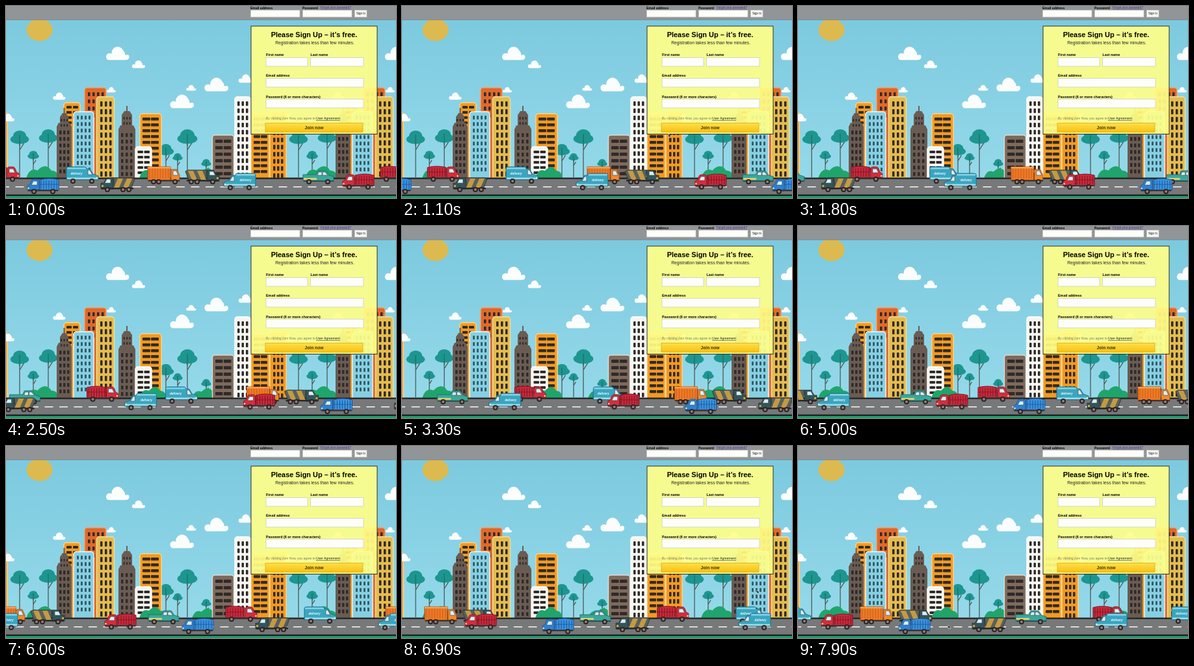
An HTML page for the animation above (8 s loop, 600x296 px).

```html
<!DOCTYPE html>
<html lang="en">
<head>
<meta charset="utf-8">
<title>Sign up</title>
<style>
html, body { margin: 0; width: 100%; height: 100%; overflow: hidden; background: #82cce1; }
svg { display: block; width: 100vw; height: 100vh; font-family: "Liberation Sans", Arial, sans-serif; }
.b { font-weight: bold; }
</style>
</head>
<body>
<svg id="stage" viewBox="0 0 600 296" preserveAspectRatio="none"></svg>
<script>
const LOOP = 8000, STEP = 100, SPEED = 0.061, SPAN = 604, TILE = 429;
const DARK = '#302b2a', BROWN = '#6a5c53', ORANGE = '#f39a20', RUST = '#df692b', GOLD = '#e4bb4d', TEAL = '#1d9690';
const PALE = '#ffd58c';

const rect = (x, y, w, h, fill, more = '') =>
  `<rect x="${x}" y="${y}" width="${w}" height="${h}" fill="${fill}" ${more}/>`;
const oval = (x, y, rx, ry, fill) => `<ellipse cx="${x}" cy="${y}" rx="${rx}" ry="${ry}" fill="${fill}"/>`;
const path = (d, fill, more = '') => `<path d="${d}" fill="${fill}" ${more}/>`;
const line = (d, color, w = 1) => path(d, 'none', `stroke="${color}" stroke-width="${w}"`);
const text = (x, y, size, str, more = '') => `<text x="${x}" y="${y}" font-size="${size}" ${more}>${str}</text>`;
const group = (x, y, body, more = '') => `<g transform="translate(${x} ${y}) ${more}">${body}</g>`;
const times = (n, fn) => Array.from({ length: n }, (_, i) => fn(i)).join('');

// scenery
function panes(x, y, cols, rows, dx, dy, w, h, fill = DARK) {
  return times(cols, c => times(rows, r => rect(x + c * dx, y + r * dy, w, h, fill, 'rx="1"')));
}

function block(x, y, w, fill, edge, inner) {
  return rect(x, y, w, 270 - y, fill, `rx="4" stroke="${edge}" stroke-width="1.4"`) + inner;
}

function tower(x, y, w, top) {
  const m = x + w / 2;
  return path(`M${x} 266V${y}l3 -6h2V${top + 14}l4 -6h${m - x - 10}V${top}h2V${top + 8}h${m - x - 10}l4 6V${y - 6}h2l3 6V266Z`, BROWN)
    + panes(m - 5.5, top + 17, 3, 2, 4.5, 8, 2.2, 4)
    + panes(x + 4, y + 6, 3, 7, (w - 5) / 3, 10, 3.5, 6);
}

function tree(x, y, r) {
  return line(`M${x} ${y - r / 2}V264M${x} ${y + r + 6}l${r * .5} -${r * .8}`, '#4d5a54', 1.3)
    + oval(x, y - r * .15, r * .8, r * .7, TEAL) + oval(x, y + r * .2, r * 1.1, r * .55, TEAL)
    + line(`M${x} ${y - r / 3}V${y + r}`, '#2b5c5a', 1);
}

const bush = (x, w, h) => path(`M${x} 266q${w * .1} -${h} ${w * .35} -${h * .7}q${w * .25} -${h * .7} ${w * .42} 0q${w * .2} 0 ${w * .23} ${h * .7}Z`, '#1fa56c');

function cloud(x, y, w) {
  return group(x, y, path('M-16 9a6 6 0 0 1 0 -11q4 -1 6 1a10 10 0 0 1 19 -6q4 4 3 8q7 -3 7 3q0 5 -7 5Z', '#fbfdfd'), `scale(${w / 38})`);
}

function city() {
  return cloud(172, 75, 35) + cloud(204, 91, 20) + cloud(324, 123, 36) + cloud(271, 149, 36)
    + cloud(82, 140, 19) + cloud(162, 130, 14) + cloud(285, 127, 15) + cloud(369, 113, 22) + cloud(3, 173, 20)
    + tree(21, 203, 13) + tree(65, 201, 13) + tree(42, 230, 8)
    + tree(246, 222, 11) + tree(279, 202, 14) + tree(264, 233, 7) + tree(308, 242, 7)
    + block(89, 149, 25, ORANGE, PALE, panes(93, 154, 2, 4, 10, 8, 8, 4))
    + block(121, 126, 33, RUST, '#f0a069', panes(126, 133, 4, 4, 7, 11, 3.5, 6))
    + bush(31, 50, 18) + tower(78, 186, 23, 157)
    + block(104, 163, 31, '#86cfe3', '#f4fafa', panes(109, 169, 4, 9, 6, 10, 3, 6, '#355e68'))
    + block(139.5, 140, 27, GOLD, '#f5dea0', panes(145, 147, 3, 10, 7, 12, 3.5, 8))
    + tower(173, 190, 26, 154)
    + block(206, 166, 33, ORANGE, PALE, panes(210, 172, 2, 10, 13, 9, 12, 4.5))
    + block(199, 217, 25, '#f4f4ef', '#fff', panes(202.5, 223, 2, 5, 10, 8, 8.5, 4))
    + bush(205, 42, 17) + bush(286, 42, 15)
    + block(317.5, 199, 33, '#7d6a5c', '#e4dcd3', panes(322, 206, 2, 6, 13, 10, 11.5, 5))
    + block(406, 163, 25, ORANGE, PALE, panes(411, 170, 3, 9, 6, 11, 3.5, 7))
    + block(377, 166, 28, ORANGE, PALE, panes(381, 172, 2, 10, 11, 9, 10, 4.5))
    + block(352, 140, 24, '#f6f7f1', '#fff', panes(356, 147, 3, 11, 6.5, 11, 3.5, 7));
}

function scenery() {
  return rect(0, 0, 600, 296, 'url(#sky)')
    + oval(51.5, 37, 20, 17, '#dcba50')
    + [-TILE, TILE, 0].map(x => group(x, 0, city())).join('')
    + rect(0, 264.5, 600, 3, '#292b2b') + rect(0, 267, 600, 24, '#777879')
    + times(28, i => rect(i * 22.5 - 8, 278, 13, 1.6, '#f0f0ee'))
    + rect(0, 290.5, 600, 2.5, '#202424') + rect(0, 293, 600, 3, '#1fa06c');
}

// vehicles face right, wheels stand on y = 0
const wheels = (...xs) => xs.map(x => oval(x, -4, 4, 4, '#25272b') + oval(x, -4, 2, 2, '#a8796a')).join('');
const glass = d => path(d, '#d9eef2', 'stroke="#31414b" stroke-width=".6"');

const slatted = (fill, dark, cab) =>
  path('M1 -6V-22q14 -4 29 0V-6Z', fill, `stroke="${dark}"`)
  + times(7, i => line(`M${4 + i * 4} -21V-8`, dark, 1)) + line('M1 -15H30', dark, .8)
  + path('M31 -5V-21q1 -2 3 -2h6q3 0 5 8l4 2v8Z', cab, `stroke="${dark}" stroke-width=".8"`)
  + glass('M34 -20h6l3 6h-9Z') + rect(2, -7, 46, 2.5, '#3b3435')
  + oval(47.5, -9, 1.3, 1.3, '#ffe28b') + wheels(10, 39);

const draw = {
  red: () => slatted('#c92a3a', '#7e1425', '#d92b3b'),
  blue: () => slatted('#3a94de', '#1a559c', '#2a82d4'),
  orange: () => rect(0, -27, 35, 21, '#ee7a25', 'stroke="#9c4313"')
    + times(8, i => line(`M${3 + i * 4.1} -25V-9`, '#c5571a', .8)) + rect(0, -27, 35, 2.5, '#f6a04d')
    + path('M36 -5V-23h9l4 9v9Z', '#f08a2a', 'stroke="#9c4313" stroke-width=".8"')
    + glass('M39 -21h5l3 7h-8Z') + rect(1, -7, 48, 2.5, '#4b3427') + wheels(9, 17, 42),
  dump: () => path('M0 -20L4 -22H33L31 -7H5Z', '#59605a', 'stroke="#3b3a36"')
    + times(2, i => path(`M${4 + i * 14} -21h8l6 14h-8Z`, '#c39a45'))
    + path('M33 -5V-22h10l5 8h4v9Z', '#33555a', 'stroke="#242a2c" stroke-width=".8"')
    + glass('M37 -20h6l3 6h-9Z') + rect(2, -7, 49, 2.5, '#262a2b')
    + rect(48, -11, 3, 3, '#e1a536') + wheels(9, 18, 42),
  van: flip => path('M0 -6V-23q0 -3 3 -3H28q3 0 3 3h5l5 8l8 3v6Z', '#3aa5c0', 'stroke="#1c6d8c" stroke-width=".9"')
    + rect(1, -25, 29, 2.5, '#84d3e1') + rect(1, -9.5, 47, 2.5, '#a4dce4')
    + glass('M33 -21h3l4 7h-7Z')
    + group(15.5, -14.5, text(0, 0, 4.8, 'delivery', 'class="b" fill="#e9fbff" font-style="italic" text-anchor="middle"'), `scale(${flip ? -1 : 1} 1)`)
    + oval(47, -9, 1.2, 1.2, '#fff0a5') + wheels(10, 39),
  pickup: () => path('M0 -5V-15H20l3 -6H35l5 7l7 2v7Z', '#3ba79b', 'stroke="#1d6d67" stroke-width=".9"')
    + rect(1, -10, 20, 3, '#d6cf72') + glass('M24 -19h5v5h-7ZM30 -19h4l4 5h-8Z')
    + rect(1, -6, 46, 1.8, '#2c4c4a') + wheels(9, 38)
};

// kind, start x, ground y, direction
const traffic = [
  ['van', 93, 274, 1], ['orange', 218, 275, 1], ['dump', 276, 275, 1], ['pickup', 457, 275, 1], ['red', 575, 271, 1],
  ['blue', 32, 290, -1], ['dump', 148, 287, -1], ['van', 334, 284, -1], ['red', 517, 283, -1]
];

function vehicle([kind, , y, dir], i) {
  const flip = dir < 0;
  const art = draw[kind](flip);
  const one = x => group(flip ? x + 50 : x, y, art, `scale(${dir} 1)`);
  return `<g id="v${i}">${one(0)}${one(-SPAN)}</g>`;
}

// page
const field = (x, y, w, h) => rect(x, y, w, h, '#fdfdfa', 'stroke="#c6c9bd" stroke-width=".7"');
const label = (x, y, size, str) => text(x, y, size, str, 'class="b"');

function page() {
  return rect(0, 0, 600, 21.5, '#919598') + rect(0, 20.8, 600, .8, '#7f8789')
    + label(376, 5, 5.05, 'Email address') + label(456, 5, 5.05, 'Password')
    + text(484, 3.8, 4.6, 'Forgot your password?', 'fill="#4b2f86" text-decoration="underline"')
    + field(376.5, 6.5, 75.5, 10.5) + field(456.5, 6.5, 75.5, 10.5) + field(536.5, 6.5, 18.5, 10.5)
    + text(546, 13.4, 4.5, 'Sign In', 'text-anchor="middle"')
    + rect(377, 31, 194, 166.5, '#ffff88', 'fill-opacity=".92" stroke="#2f3024" stroke-width="1"')
    + text(474, 48, 10.95, 'Please Sign Up – it’s free.', 'class="b" text-anchor="middle"')
    + text(475, 59, 6.7, 'Registration takes less than few minutes.', 'text-anchor="middle" fill="#222"')
    + label(400, 77, 5.4, 'First name') + label(468.5, 77, 5.4, 'Last name')
    + label(400, 109, 5.4, 'Email address') + label(400, 141.5, 5.4, 'Password (6 or more characters)')
    + field(400, 79.5, 64, 13.5) + field(468.5, 79.5, 81.5, 13.5)
    + field(400, 111.5, 150, 13.5) + field(400, 143.5, 150, 13.5)
    + text(400, 175, 5, 'By clicking Join Now, you agree to', 'fill="#7c7b62"')
    + text(477, 175, 5.1, 'User Agreement', 'fill="#222" text-decoration="underline"')
    + rect(399, 180.5, 150, 14, 'url(#gold)', 'stroke="#d3a610" stroke-width=".7"')
    + text(474, 189.6, 6.7, 'Join now', 'class="b" text-anchor="middle" fill="#3c3210"');
}

const shade = (id, a, b) => `<linearGradient id="${id}" x2="0" y2="1"><stop stop-color="${a}"/><stop offset="1" stop-color="${b}"/></linearGradient>`;
const stage = document.getElementById('stage');
stage.innerHTML = `<defs>${shade('sky', '#7ac8de', '#98dbeb')}${shade('gold', '#fde04a', '#f8c010')}</defs>`
  + scenery() + traffic.map(vehicle).join('') + page()
  + `<g id="cursor">${path('M0 0V5.5L1.4 4.3L2.4 6.4L3.3 6L2.4 4H4Z', '#111', 'stroke="#fff" stroke-width=".5"')}</g>`;

const cars = traffic.map((_, i) => document.getElementById('v' + i));
const cursor = document.getElementById('cursor');
// time, x, y for each visible stretch of the pointer
const trails = [
  [[1000, 404, 206], [1100, 410, 197], [1300, 424, 180]],
  [[6700, 596, 212], [6900, 546, 222], [7900, 231, 276]]
];

function pointer(t) {
  for (const trail of trails) {
    for (let i = 1; i < trail.length; i++) {
      const [t0, x0, y0] = trail[i - 1], [t1, x1, y1] = trail[i];
      if (t < t0 || t > t1) continue;
      const k = (t - t0) / (t1 - t0);
      return [x0 + (x1 - x0) * k, y0 + (y1 - y0) * k];
    }
  }
  return [-20, -20];
}

function show(now) {
  const t = Math.floor((now % LOOP) / STEP) * STEP;
  traffic.forEach(([, x, , dir], i) => {
    const p = x + dir * SPEED * t;
    cars[i].setAttribute('transform', `translate(${((p % SPAN) + SPAN) % SPAN} 0)`);
  });
  cursor.setAttribute('transform', `translate(${pointer(t)})`);
}

const start = performance.now();
function tick() {
  show(performance.now() - start);
  requestAnimationFrame(tick);
}
tick();
</script>
</body>
</html>
```
